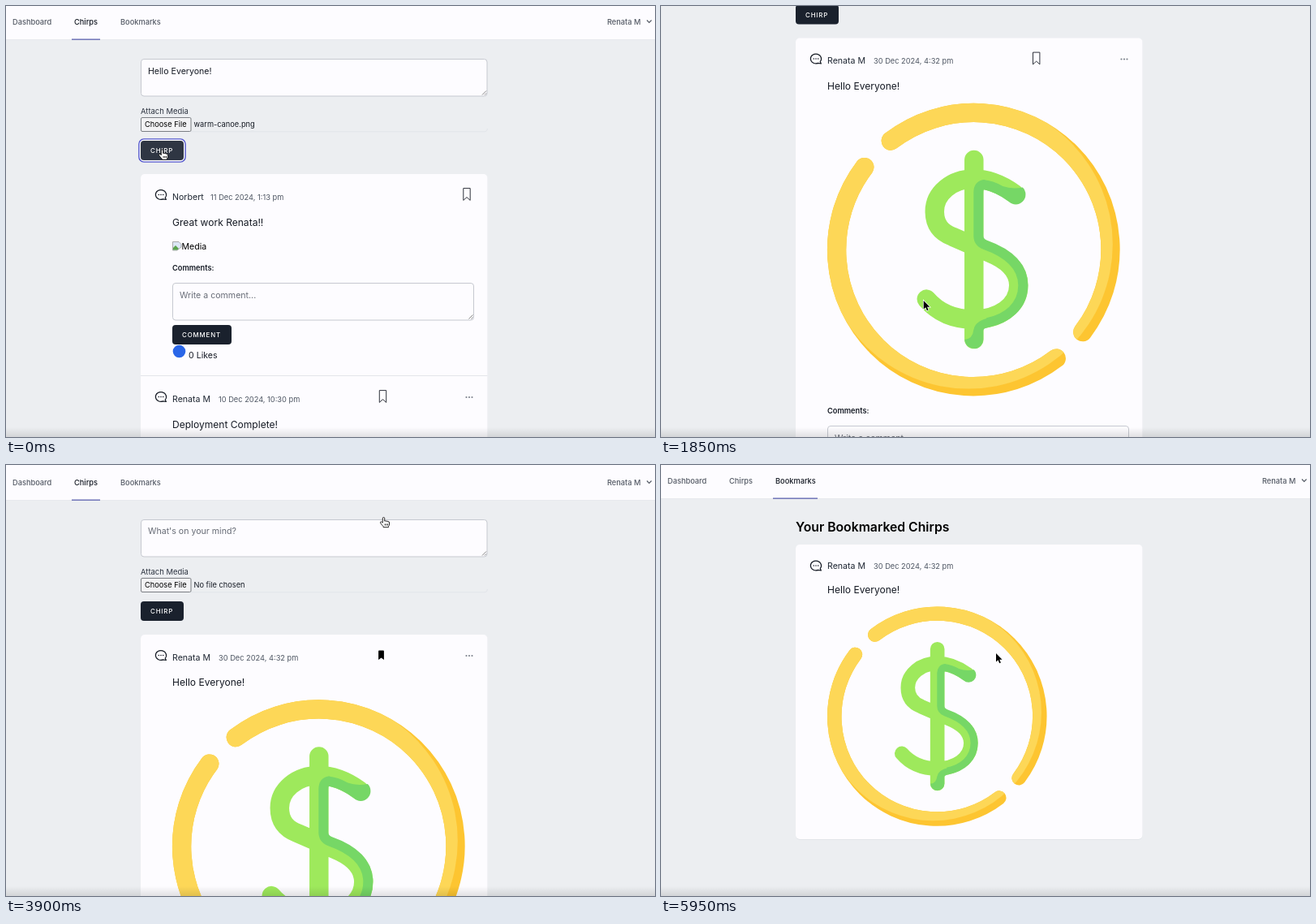
Recreate the animation shown at these times as an HTML page. Size 800 px wide and 531 px high, loop 6000 ms.

```html
<!DOCTYPE html>
<html lang="en">
<head>
<meta charset="utf-8">
<title>Chirps</title>
<style>
  html, body { margin: 0; height: 100%; overflow: hidden; background: #eceef1; }
  svg { display: block; width: 100vw; height: 100vh; }
  text { font-family: Inter, "Open Sans", sans-serif; white-space: pre; }
</style>
</head>
<body>
<svg id="stage" viewBox="0 0 800 531"></svg>
<script>
const LOOP = 6000;
const INK = '#151a24', GREY = '#555b66', PAPER = '#fdfcff', DARK = '#1a212d', HOVER = '#2f3643';
const BODY = 10.6, SMALL = 9.25, LARGE = 12.05;
const USER = 'Renata M';

// Markup helpers
const text = (s, x, y, size = BODY, fill = INK, extra = '') =>
  `<text x="${x}" y="${y}" font-size="${size}" fill="${fill}" ${extra}>${s}</text>`;
const rect = (x, y, w, h, fill, extra = '') =>
  `<rect x="${x}" y="${y}" width="${w}" height="${h}" fill="${fill}" ${extra}/>`;
const group = (id, body) => `<g id="${id}">${body}</g>`;
const place = (x, y, body) => `<g transform="translate(${x} ${y})">${body}</g>`;

const button = (label, x, y, w, id = '') =>
  rect(x, y, w, 24, DARK, `rx="4" ${id && `id="${id}"`}`) +
  text(label, x + 12, y + 15, 7.9, '#fff', 'font-weight="500" letter-spacing=".84"');

const field = (x, y, w) =>
  rect(x + .5, y + .5, w - 1, 45.5, PAPER, 'rx="3.5" stroke="#c6c9d0"') +
  `<path d="M${x + w - 6.5} ${y + 44.5}l5-5M${x + w - 3.5} ${y + 44.5}l2-2" stroke="#666" stroke-width=".8"/>`;

const bubble = (x, y) => place(x, y,
  `<path d="M5.2 3.6A6.6 5.9 0 1 0 2.6 5.4L6.4 6Z" fill="none" stroke="${INK}" stroke-width="1.2" stroke-linejoin="round"/>` +
  [-2.7, 0, 2.7].map(d => `<circle cx="${d}" r=".8" fill="${INK}"/>`).join(''));

const OUTLINE = '<path d="M-4.2-7.4H4.2V7.4L0 3.6-4.2 7.4Z" fill="none" stroke="#242932" stroke-width=".95" stroke-linejoin="round"/>';
const FILLED = '<path d="M-2.6-5.6H2.6Q3.4-5.6 3.4-4.8V5.8L0 3.2-3.4 5.8V-4.8Q-3.4-5.6-2.6-5.6Z"/>';

const dots = y => [567.5, 571, 574.5].map(x => `<circle cx="${x}" cy="${y}" r="1.1" fill="#7d838d"/>`).join('');

const header = (name, date, dateX, y) =>
  text(name, 205, y, BODY, '#1f2733') + text(date, dateX, y, SMALL, '#4d5562');

const comments = y =>
  text('Comments:', 205, y, SMALL, INK, 'font-weight="600"') + field(205, y + 15, 372) +
  text('Write a comment...', 214, y + 34, BODY, '#686d77') + button('COMMENT', 205, y + 67, 73);

const nav = active =>
  rect(0, -30, 800, 71.4, PAPER) + rect(0, 41.2, 800, .7, '#e3e5ea') +
  [['Dashboard', 8, 48], ['Chirps', 84, 29], ['Bookmarks', 141, 49]].map(([s, x, w]) =>
    text(s, x, 23.4, SMALL, s === active ? INK : GREY,
      `font-weight="500" ${s === 'Bookmarks' && s !== active ? 'id="tab"' : ''}`) +
    (s === active ? rect(x - 3, 40.4, w + 6, 1.6, '#777cbb') : '')).join('') +
  text(USER, 741, 23, SMALL, GREY, 'font-weight="500"') +
  '<path d="M790 17.5l2.8 2.8 2.8-2.8" fill="none" stroke="#555b66" stroke-width="1.2"/>';

const card = (y, h) =>
  rect(166, y + .7, 427.5, h, '#dfe2e7', 'rx="5"') + rect(166, y, 427.5, h, PAPER, 'rx="5"');

// Coin, centred on the origin with radius 180
const ring = color =>
  `<path d="M-102-134A168.4 168.4 0 0 1 134.5 101.5M102 134A168.4 168.4 0 0 1-134.5-101.5" stroke="${color}" stroke-width="23.3"/>`;
const coin = (x, y, scale) => `<g transform="translate(${x} ${y}) scale(${scale})" fill="none" stroke-linecap="round">
  ${ring('#fdc531')}<g clip-path="url(#lit)">${ring('#fdd757')}</g>
  <path d="M.5-110.5V110.5M50-69C36-79 18-87 0-87C-27-87-48-69-48-47C-48-30-39-21-26-16L20 4C42 13 55.5 26 55.5 44C55.5 70 30 86 0 86C-27 86-46 75-58 61" stroke="#9ee95c" stroke-width="23.5"/>
  <path d="M14-80Q6-80 6-70V-17Q6-9 14-6C45 5 61 21 61 44C61 70 41 85 17 90" stroke="#76d766" stroke-width="12"  stroke-linecap="butt"/>
  <path d="M12-86Q24-85 36-78Q47-74 60.5-76.500A11.750 11.750 0 0 1 43.500-59.200Q27-71 12-74ZM18 84.500V96Q12 97 12 100V110A11.500 11.500 0 0 1-11 111Q-1 110 0 99Q2 88 18 84.500Z" fill="#76d766"/>
</g>`;

const defs = `<defs>
  <clipPath id="lit"><circle cx="-6.5" cy="-6.5" r="178"/></clipPath>
  <linearGradient id="fade" x2="0" y2="1"><stop stop-opacity="0"/><stop offset="1" stop-opacity=".11"/></linearGradient>
</defs>`;

const form =
  field(166, 65, 427.5) +
  group('draft', text('Hello Everyone!', 175, 83.5)) +
  group('empty', text("What's on your mind?", 175, 83.5, BODY, '#656a74')) +
  text('Attach Media', 166, 133, 9.45, '#2d3440') +
  '<path d="M228 154.8H590Q593.5 154.8 593.5 151" fill="none" stroke="#e2e5ea"/>' +
  rect(166.5, 137.5, 61.5, 17, '#f2f2f4', 'rx="1.5" stroke="#6f7278" stroke-width=".9"') +
  text('Choose File', 171, 149.4, SMALL, '#000') +
  group('file', text('warm-canoe.png', 231.5, 149.4, SMALL)) +
  group('noFile', text('No file chosen', 231.5, 149.4, SMALL)) +
  group('focus', rect(163.9, 163.9, 57.2, 28.2, '#fff', 'rx="6" stroke="#5255cb" stroke-width="1.4"')) +
  button('CHIRP', 166, 166, 53, 'send');

const oldPosts =
  bubble(191, 232.5) + header('Norbert', '11 Dec 2024, 1:13 pm', 252, 238.7) + place(568, 232, OUTLINE) +
  text('Great work Renata!!', 205, 270.5, LARGE) +
  '<path d="M205.5 290.5H213L216 293.5V297L211 301H205.5Z" fill="#dce6f5" stroke="#999" stroke-width=".8"/>' +
  '<path d="M206 300.5V298L209 295L213 299L211 300.5Z" fill="#5aa34c"/>' +
  text('Media', 216.5, 300, BODY, '#000') + comments(326) +
  '<circle cx="213.5" cy="425.5" r="7.8" fill="#2a66e8"/>' + text('0 Likes', 225, 434) +
  rect(166, 455, 427.5, 1, '#e3e5ea') +
  bubble(191, 481.5) + header(USER, '10 Dec 2024, 10:30 pm', 262, 487.5) +
  place(464.5, 481, OUTLINE) + dots(482) + text('Deployment Complete!', 205, 519.5, LARGE);

const newPost =
  bubble(191, 232.5) + header(USER, '30 Dec 2024, 4:32 pm', 262, 238.7) +
  group('hollow', place(462.7, 232, OUTLINE)) + group('solid', place(462.5, 232.2, FILLED)) + dots(233) +
  text('Hello Everyone!', 205, 270.5, LARGE) + coin(385.3, 467.6, 1) + comments(669.5);

const savedPage = nav('Bookmarks') +
  text('Your Bookmarked Chirps', 166, 82, 15.75, '#000', 'font-weight="600"') +
  card(98, 363) + bubble(191, 124) + header(USER, '30 Dec 2024, 4:32 pm', 262, 128) +
  text('Hello Everyone!', 205, 157.6, LARGE) + coin(340.3, 309.6, .75);

const cursor =
  group('arrow', '<path d="M0 0V10.6L2.5 8.3 4.2 12.2 5.9 11.4 4.3 7.7H7.6Z" stroke="#fff" stroke-width="1.4" paint-order="stroke"/>') +
  group('hand', '<path d="M-1.2 1.2a1.2 1.2 0 0 1 2.4 0V4.6q1.2-.7 2.2.2 1.2-.6 2 .4 1.6-.3 1.6 1.3V8.5q0 1.6-1 2.6V12.2H-.4V11.2Q-2.5 9-4 6.8q-.3-1.4 1-1.4 1 .2 1.8 1.3ZM1.6 8v2M3.3 8v2M5 8v2" fill="#fff" stroke="#111" stroke-width=".9" stroke-linejoin="round"/>');

const stage = document.getElementById('stage');
stage.innerHTML = defs + rect(0, 0, 800, 531, '#eceef1') +
  group('feed', nav('Chirps') + group('hoverLine', rect(138, 40.4, 55, 1.6, '#c8cbd3')) + form +
    card(207, 700) + group('before', oldPosts) + group('after', newPost)) +
  group('saved', savedPage) + rect(0, 519, 800, 12, 'url(#fade)') +
  group('status', rect(-4, 517.5, 89.5, 18, '#d5e1fa', 'rx="3" stroke="#aebbd8"') +
    text('rvano.test/bookmarks', 80.5, 528, 8.6, '#272c38', 'text-anchor="end"')) +
  group('cursor', cursor);

const el = {};
stage.querySelectorAll('[id]').forEach(node => el[node.id] = node);

// Motion: [time, value...] keys joined by smooth easing
const SCROLL = [[1400, 0], [1830, -167.5], [3290, -167.5], [3720, 6], [3900, 2], [4000, 0]];
const POINTER = [[1250, 192.5, 177], [1600, 323.7, 363], [2000, 323.7, 363], [2750, 464.5, 63],
  [3150, 464.5, 63], [3300, 465.5, 64.5], [3980, 465.5, 64.5], [4580, 169.5, 17],
  [5230, 169.5, 17], [5780, 413, 232]];

function sample(keys, t) {
  const i = keys.findIndex(k => k[0] > t);
  if (i === 0) return keys[0].slice(1);
  if (i < 0) return keys[keys.length - 1].slice(1);
  const a = keys[i - 1], b = keys[i];
  const p = (t - a[0]) / (b[0] - a[0]), e = p * p * (3 - 2 * p);
  return a.slice(1).map((v, n) => v + (b[n + 1] - v) * e);
}

const show = (on, ...ids) => ids.forEach(id => el[id].style.display = on ? '' : 'none');
const within = (t, a, b) => t >= a && t < b;

function draw(t) {
  const posted = t >= 500, marked = t >= 2900, opened = t >= 5100;
  const hover = within(t, 4530, 5100);
  const hand = t < 1300 || within(t, 2720, 4050) || within(t, 4530, 5260);
  show(!posted, 'draft', 'file', 'focus', 'before');
  show(posted, 'empty', 'noFile', 'after');
  show(!marked, 'hollow');
  show(marked, 'solid');
  show(!opened, 'feed');
  show(opened, 'saved');
  show(hover, 'hoverLine');
  show(within(t, 4600, 5350), 'status');
  show(hand, 'hand');
  show(!hand, 'arrow');
  el.send.setAttribute('fill', t < 1300 ? HOVER : DARK);
  el.tab.setAttribute('fill', hover ? '#333a46' : GREY);
  el.feed.setAttribute('transform', `translate(0 ${sample(SCROLL, t)[0]})`);
  el.cursor.setAttribute('transform', `translate(${sample(POINTER, t)})`);
}

const start = performance.now();
function tick() {
  draw((performance.now() - start) % LOOP);
  requestAnimationFrame(tick);
}
tick();
</script>
</body>
</html>
```
